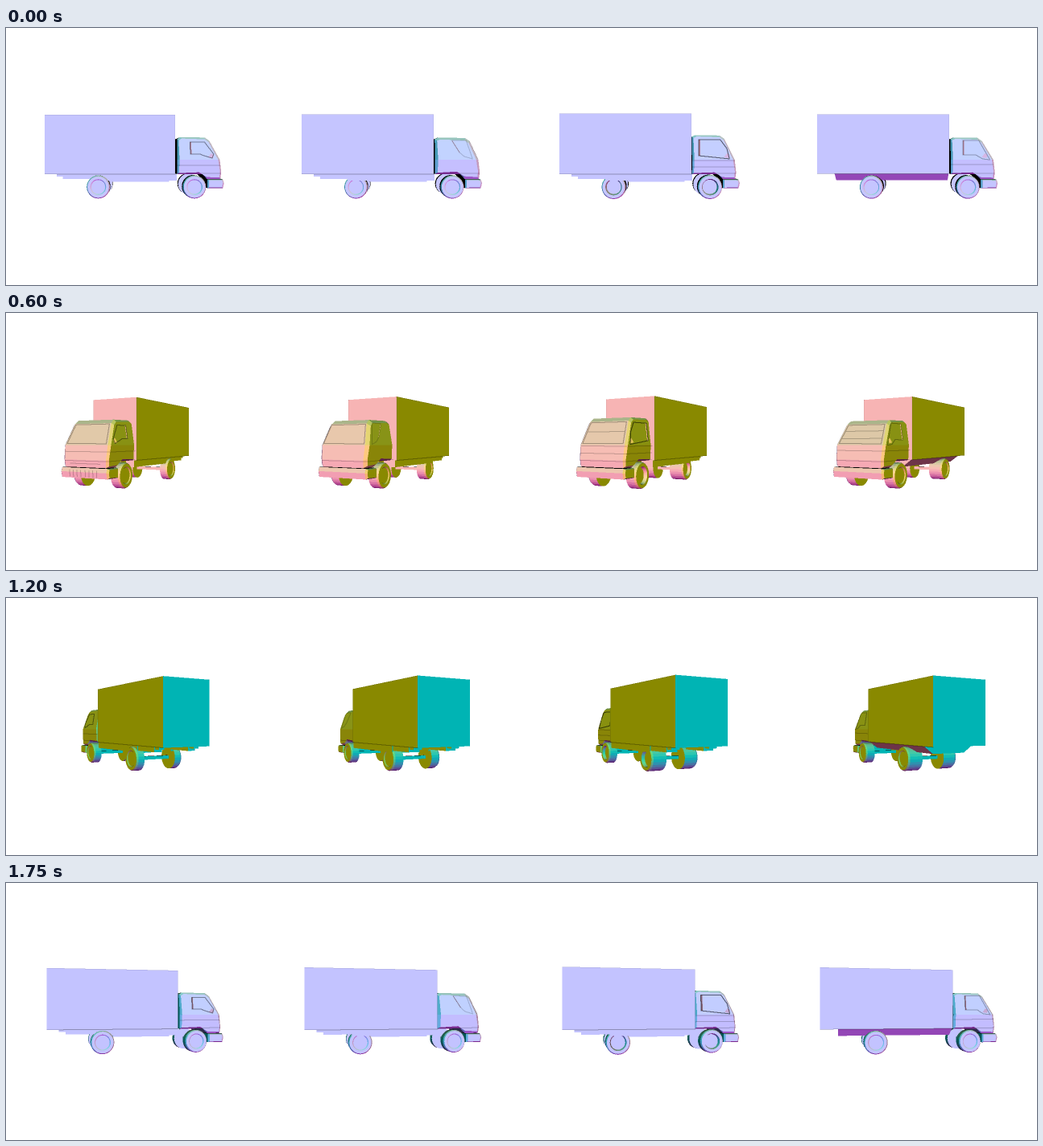
An HTML page with a canvas for the animation above (1800 ms loop, 1280 px wide and 320 px high).

```html
<!DOCTYPE html>
<html lang="en">
<head>
<meta charset="utf-8">
<title>Turning trucks</title>
<style>
  html, body { margin: 0; width: 100%; height: 100%; overflow: hidden; background: #fff; }
  canvas { position: absolute; left: 0; top: 88px; width: 1280px; height: 140px; }
</style>
</head>
<body>
<canvas id="view" width="2560" height="280"></canvas>
<script>
const STEP = 50, STEPS = 36;
const SS = 2, TOP = 88, W = 1280 * SS, H = 140 * SS;
const FOCAL = 473, DIST = 504, HORIZON = 160;
const BELT = -4;

const ctx = document.getElementById('view').getContext('2d');
const image = ctx.createImageData(W, H);
const pixels = new Uint32Array(image.data.buffer);
const depth = new Float32Array(W * H);
const inked = new Uint8Array(W * H);

const dot = (a, b) => a[0] * b[0] + a[1] * b[1] + a[2] * b[2];
const sub = (a, b) => a.map((v, i) => v - b[i]);
const cross = (a, b) => [
  a[1] * b[2] - a[2] * b[1],
  a[2] * b[0] - a[0] * b[2],
  a[0] * b[1] - a[1] * b[0]
];
const unit = a => { const l = Math.hypot(...a) || 1; return a.map(v => v / l); };
const mean = pts => [0, 1, 2].map(i => pts.reduce((s, p) => s + p[i], 0) / pts.length);

// Collects faces and lines of one truck.
function model() {
  const faces = [], lines = [];

  const face = (pts, n) => faces.push({ pts, n: unit(n) });

  // Face whose normal points away from the middle of its part
  function outer(pts, middle) {
    let n = cross(sub(pts[1], pts[0]), sub(pts[2], pts[0]));
    if (dot(n, sub(mean(pts), middle)) < 0) n = n.map(v => -v);
    face(pts, n);
  }

  const line = (pts, k = 0.75) => {
    for (let i = 1; i < pts.length; i++) lines.push({ a: pts[i - 1], b: pts[i], k });
  };

  const loop = (pts, k) => line([...pts, pts[0]], k);

  // Side profile spanned across the width, with bevelled sides
  function slab(profile, width, bevel, belt) {
    const count = profile.length;
    const mx = profile.reduce((s, p) => s + p[0], 0) / count;
    const my = profile.reduce((s, p) => s + p[1], 0) / count;
    const middle = [mx, my, 0];
    const rim = s => profile.map(([x, y]) => [x, y, s * (width(y) - bevel)]);
    const cap = s => profile.map(([x, y]) => {
      const l = Math.hypot(mx - x, my - y);
      const ix = x + (mx - x) / l * bevel, iy = y + (my - y) / l * bevel;
      return [ix, iy, s * width(iy)];
    });
    const left = rim(-1), right = rim(1);
    for (let i = 0; i < count; i++) {
      const j = (i + 1) % count;
      outer([left[i], left[j], right[j], right[i]], middle);
    }
    for (const s of [-1, 1]) {
      const edge = rim(s), side = cap(s);
      if (bevel) for (let i = 0; i < count; i++) {
        const j = (i + 1) % count;
        outer([edge[i], edge[j], side[j], side[i]], middle);
      }
      if (belt === undefined) outer(side, middle);
      else {
        outer(side.filter((_, i) => profile[i][1] >= belt), middle);
        outer(side.filter((_, i) => profile[i][1] <= belt), middle);
      }
    }
  }

  function box(x0, x1, y0, y1, z0, z1) {
    const mid = [(x0 + x1) / 2, (y0 + y1) / 2, (z0 + z1) / 2];
    for (const x of [x0, x1]) outer([[x, y0, z0], [x, y1, z0], [x, y1, z1], [x, y0, z1]], mid);
    for (const y of [y0, y1]) outer([[x0, y, z0], [x1, y, z0], [x1, y, z1], [x0, y, z1]], mid);
    for (const z of [z0, z1]) outer([[x0, y0, z], [x1, y0, z], [x1, y1, z], [x0, y1, z]], mid);
  }

  // Pair of wheels turned from a radius profile
  function wheels(x, y, r, z0, z1, hub) {
    const turn = [[0, z0], [r, z0], [r, z1 - 2], [r * 0.92, z1], [r * 0.68, z1],
      [r * 0.6, z1 - hub], [0, z1 - hub]];
    const segs = 28;
    for (const s of [-1, 1]) for (let i = 1; i < turn.length; i++) {
      const [ra, za] = turn[i - 1], [rb, zb] = turn[i];
      const at = (rad, z, a) => [x + rad * Math.cos(a), y + rad * Math.sin(a), s * z];
      for (let k = 0; k < segs; k++) {
        const a = k / segs * 2 * Math.PI, b = (k + 1) / segs * 2 * Math.PI, m = (a + b) / 2;
        face([at(ra, za, a), at(ra, za, b), at(rb, zb, b), at(rb, zb, a)],
          [(zb - za) * Math.cos(m), (zb - za) * Math.sin(m), s * (ra - rb)]);
      }
    }
  }

  return { faces, lines, face, line, loop, slab, box, wheels };
}

function truck(t) {
  const m = model();
  const width = y => t.cabW - t.taper * Math.max(0, y - BELT) - 0.06 * Math.max(0, BELT - y);
  const { boxW: bw, back, front, top, base } = t;

  // Cargo box
  m.box(back, front, base, top, -bw, bw);
  for (const z of [-bw, bw]) {
    m.line([[back, top, z], [front, top, z]], 0.86);
    m.line([[back, base, z], [front, base, z]], 0.72);
    m.line([[front, base, z], [front, top, z]], 0.9);
  }

  // Frame and axles
  if (t.tub) {
    m.slab([[-91, base], [50, base], [50, -30], [-91, -30]], y => 33 + 1.35 * (y - base), 0);
  } else {
    for (const s of [-1, 1]) {
      m.box(-56, 52, -30, base, s * 18, s * (bw - 2));
      m.box(t.tail, -56, -28, base, s * 18, s * (bw - 3));
      m.box(t.tail - 8, t.tail, -25, base, s * 20, s * (bw - 4));
    }
    m.box(-30, 45, -33, base, -6, 6);
  }
  m.box(-47, -43, -40, -36, -t.dual, t.dual);
  m.box(72, 76, -40, -36, -21, 21);
  m.wheels(-45.5, -38, t.tyre, t.dual, t.cabW + 0.8, t.hub);
  m.wheels(74, -38, t.tyre, 20.5, t.cabW + 0.8, t.hub);

  // Cab
  const [x0, rear, roof, brow, sill] = t.cab;
  const hood = [[x0, BELT], [x0, rear], [x0 + 4, roof], [brow, roof - 0.5], [brow + 5.5, roof - 4.5],
    [sill, BELT], [sill + 2, -20], [sill + 1, -28], [90, -28], [84, -22], [x0, -22]];
  m.slab(hood, width, t.bevel, BELT);

  // Windscreen and front seams
  const pane = (u, inset) => {
    const x = brow + 5.5 + (sill - brow - 5.5) * u, y = roof - 4.5 + (BELT - roof + 4.5) * u;
    return [-1, 1].map(s => [x + 0.3, y + 0.2, s * (width(y) - inset)]);
  };
  const [a, b] = pane(0.05, 4.5), [c, d] = pane(0.94, 4.5);
  m.loop([a, b, d, c], 0.72);
  for (const u of t.bands) m.line(pane(u, 4.5), 0.78);
  for (const y of t.seams) {
    const x = sill + (BELT - y) / 8 + 0.2, z = width(y);
    m.line([[x0, y, z], [x - 3, y, z], [x, y, z - 3], [x, y, 3 - z], [x - 3, y, -z], [x0, y, -z]], 0.8);
  }

  // Side windows with jamb and mirror
  for (const s of [-1, 1]) {
    const on = ([x, y]) => [x, y, s * (width(y) + 0.3)];
    const win = t.glass.map(on);
    m.loop(win, t.frame);
    const [p, q] = [t.glass[0], t.glass[t.glass.length - 1]];
    m.face([p, [p[0] + t.jamb, p[1]], [q[0] + t.jamb, q[1]], q].map(on), [0.9, 0, s * 0.45]);
    if (t.mirror) {
      m.face([[91, -1], [97, -2], [98, 2], [95, 4]].map(on), [0.55, 0.1, s * 0.8]);
    }
  }

  // Bumper
  m.slab([[90, -28.5], [109.5, -28.5], [111, -33], [109.5, -39.5], [90, -39.5]],
    () => t.cabW + 1, 2);
  if (t.grille) {
    for (const z of [-18, -13, -8, -3, 3, 8, 13, 18]) {
      m.line([[111.3, -31, z], [111, -38, z]], 0.8);
    }
    m.line([[108, -24, -20], [108, -24, 20]], 0.8);
  }
  return m;
}

const common = {
  boxW: 35, back: -112, front: 50.8, top: 52.3, base: -22, tail: -90, dual: 20, tyre: 14.5, hub: 1,
  cabW: 32, taper: 0.16, bevel: 2.5, bands: [], seams: [-11, -21], frame: 0.7, jamb: 1.5, mirror: true
};
const trucks = [
  { boxW: 31, top: 52, front: 50, dual: 21.5, cabW: 31, cab: [53, 22, 24.5, 88, 106], grille: true,
    glass: [[69, 18], [87, 18], [98, 3], [96, -2], [86, 1], [81, 3], [69, 3]], frame: 0.6 },
  { cab: [53, 22, 24, 91.5, 107], taper: 0.2, bevel: 3.5, seams: [-21], mirror: false, jamb: 0.6,
    glass: [[74, 20], [92, 20], [99, -3], [89, 0], [83, 5]], frame: 0.84 },
  { top: 53, dual: 13, tyre: 15, hub: 4, cab: [52, 25, 27, 87, 105], taper: 0.13, bands: [0.45],
    seams: [-5, -13, -21], glass: [[60, 21], [87, 21], [95, 10], [98, -3], [60, 1]], frame: 0.45, jamb: 2 },
  { dual: 15, cabW: 33, base: -21.3, cab: [53, 22, 24, 87, 106], bands: [0.35, 0.7], tub: true,
    seams: [-10, -21], glass: [[68, 20], [88, 20], [101, -4], [92, -3], [84, 2], [68, 2]], frame: 0.72 }
].map(t => truck({ ...common, ...t }));

// Normal colour lit from the viewer
function shade(n, view) {
  const c = Math.max(0, dot(n, view));
  const light = 1.13 * c * (1 - 0.4 * c * (1 - c));
  const [r, g, b] = n.map(v =>
    Math.round(255 * Math.min(1, light * (0.5 + 0.5 * v)) ** (1 / 2.2)));
  return (255 << 24 | b << 16 | g << 8 | r) >>> 0;
}

function triangle(a, b, c, color) {
  const area = (b[0] - a[0]) * (c[1] - a[1]) - (b[1] - a[1]) * (c[0] - a[0]);
  if (Math.abs(area) < 1e-6) return;
  const x0 = Math.max(0, Math.floor(Math.min(a[0], b[0], c[0])));
  const x1 = Math.min(W - 1, Math.ceil(Math.max(a[0], b[0], c[0])));
  const y0 = Math.max(0, Math.floor(Math.min(a[1], b[1], c[1])));
  const y1 = Math.min(H - 1, Math.ceil(Math.max(a[1], b[1], c[1])));
  for (let y = y0; y <= y1; y++) for (let x = x0; x <= x1; x++) {
    const px = x + 0.5, py = y + 0.5;
    const u = ((b[0] - px) * (c[1] - py) - (b[1] - py) * (c[0] - px)) / area;
    const v = ((c[0] - px) * (a[1] - py) - (c[1] - py) * (a[0] - px)) / area;
    const w = 1 - u - v;
    if (u < 0 || v < 0 || w < 0) continue;
    const near = u * a[2] + v * b[2] + w * c[2], i = y * W + x;
    if (near > depth[i]) { depth[i] = near; pixels[i] = color; }
  }
}

// Darkens the surface along a visible line
function stroke(a, b, k) {
  const count = Math.ceil(Math.max(Math.abs(b[0] - a[0]), Math.abs(b[1] - a[1]))) || 1;
  for (let s = 0; s <= count; s++) {
    const [x, y, near] = a.map((v, i) => v + (b[i] - v) * s / count);
    for (let j = 0; j < 4; j++) {
      const px = Math.round(x - 1) + (j & 1), py = Math.round(y - 1) + (j >> 1);
      const i = py * W + px;
      if (px < 0 || px >= W || py < 0 || py >= H || inked[i]) continue;
      if (!depth[i] || near < depth[i] * 0.996) continue;
      inked[i] = 1;
      const p = pixels[i];
      pixels[i] = (255 << 24 | (p >> 16 & 255) * k << 16 | (p >> 8 & 255) * k << 8 | (p & 255) * k) >>> 0;
    }
  }
}

function draw(step) {
  const turn = step / STEPS * 2 * Math.PI, sin = Math.sin(turn), cos = Math.cos(turn);
  const view = [sin, 0, cos], eye = [DIST * sin, 0, DIST * cos];
  pixels.fill(0xffffffff);
  depth.fill(0);
  inked.fill(0);
  trucks.forEach(({ faces, lines }, i) => {
    const project = ([x, y, z]) => {
      const near = 1 / (DIST - x * sin - z * cos), k = FOCAL * near;
      return [(160 + 320 * i + (x * cos - z * sin) * k) * SS, (HORIZON - y * k - TOP) * SS, near];
    };
    for (const { pts, n } of faces) {
      if (dot(n, sub(eye, mean(pts))) <= 0) continue;
      const flat = pts.map(project), color = shade(n, view);
      for (let j = 2; j < flat.length; j++) triangle(flat[0], flat[j - 1], flat[j], color);
    }
    for (const { a, b, k } of lines) stroke(project(a), project(b), k);
  });
  ctx.putImageData(image, 0, 0);
}

let start, shown = 0;
function tick(now) {
  start ??= now;
  const step = Math.floor((now - start) / STEP) % STEPS;
  if (step !== shown) draw(shown = step);
  requestAnimationFrame(tick);
}
draw(0);
requestAnimationFrame(tick);
</script>
</body>
</html>
```
